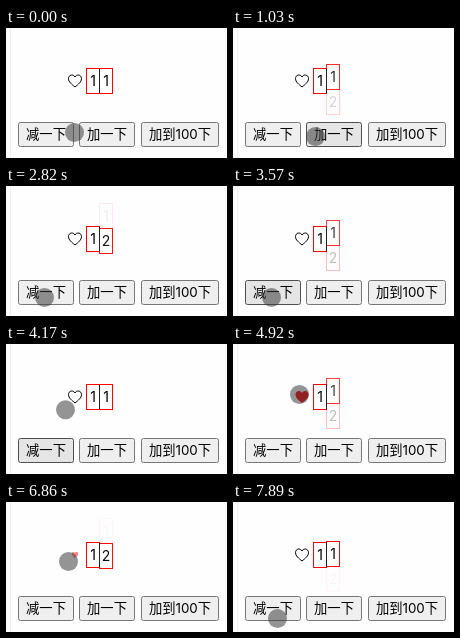
These frames come from a looping animation (221x130 px, 8000 ms). An HTML page with a canvas:

```html
<!DOCTYPE html>
<html lang="zh">
<meta charset="utf-8">
<style>
html, body { margin: 0; width: 100%; height: 100%; overflow: hidden; background: #fefefe }
canvas { display: block }
</style>
<canvas id="stage" width="221" height="130"></canvas>
<script>
const ctx = document.getElementById('stage').getContext('2d');
const LOOP = 8000, TICK = 148.4;
const SLIDE = 7.5, GLIDE = 4;      // lengths of a digit slide and a pointer move, in ticks
const TAPS = [5.75, 18.4, 31.1, 45.75];
const [PLUS, MINUS, LIKE, UNLIKE] = TAPS;
const FONT = 'Inter, "Noto Sans CJK SC", sans-serif';
const heart = new Path2D('M0 6C-3 3.5-6.5 1-6.5-2.3C-6.5-6.5-1.6-7.2 0-4C1.6-7.2 6.5-6.5 6.5-2.3C6.5 1 3 3.5 0 6Z');

// Pointer moves: start tick and destination
const moves = [
  [-3, 45, 110], [2, 82, 108], [13, 38, 111], [25, 66, 50],
  [34, 43, 101], [42, 62, 59], [48, 44, 116]
];

const clamp = u => Math.max(0, Math.min(1, u));

function pointerAt(k) {
  let x = 68, y = 104;
  for (const [start, toX, toY] of moves) {
    const u = start < 0 ? clamp(k) : clamp((k - start) / GLIDE);
    x += (toX - x) * u;
    y += (toY - y) * u;
  }
  return [x + .5, y + .5];
}

function label(text, x, y, size) {
  ctx.font = `${size}px ${FONT}`;
  ctx.textAlign = 'center';
  ctx.fillStyle = '#000';
  ctx.fillText(text, x, y);
}

function button(text, x, w, hover) {
  ctx.beginPath();
  ctx.roundRect(x + .5, 94.5, w - 1, 24, 2);
  ctx.fillStyle = hover ? '#e5e5e5' : '#efefef';
  ctx.fill();
  ctx.strokeStyle = hover ? '#4f4f4f' : '#767676';
  ctx.stroke();
  label(text, x + w / 2, 111, 13.33);
}

function digit(n, x, dy, alpha) {
  ctx.globalAlpha = alpha;
  ctx.strokeStyle = '#f00';
  ctx.strokeRect(x + .5, 40.5 + dy, 13, 25);
  label(n, x + 7, 58 + dy, 14);
  ctx.globalAlpha = 1;
}

function drawDigits(k) {
  digit(1, 80, 0, 1);
  const count = TAPS.filter(t => t <= k).length;
  const u = count ? clamp((k - TAPS[count - 1]) / SLIDE) : 1;
  const up = count % 2, dir = up ? -1 : 1;   // taps alternate between 1 to 2 and back
  if (u < 1) digit(2 - up, 93, Math.round(25 * u * dir), 1 - u);
  digit(1 + up, 93, Math.round(25 * (u - 1) * dir), u);
  ctx.fillStyle = '#222';
  ctx.fillRect(93, 41, 1, 24);
}

function drawHeart(k) {
  const liked = clamp(2 * (k - LIKE)) - clamp(2 * (k - UNLIKE));
  ctx.save();
  ctx.translate(69, 53);
  if (liked) {
    ctx.scale(liked, liked);
    ctx.globalAlpha = liked;
    ctx.fillStyle = '#f00';
    ctx.fill(heart);
  } else {
    ctx.strokeStyle = '#000';
    ctx.stroke(heart);
  }
  ctx.restore();
}

function draw(now) {
  const k = Math.floor((now % LOOP + 12) / TICK);
  ctx.fillStyle = '#fefefe';
  ctx.fillRect(0, 0, 221, 130);
  ctx.fillStyle = '#efefef';
  ctx.fillRect(4, 0, 1, 130);
  ctx.lineWidth = 1;
  button('减一下', 12, 56, k > MINUS + 1 && k < LIKE);
  button('加一下', 73, 56, k > PLUS && k < MINUS);
  button('加到100下', 135, 78, false);
  drawDigits(k);
  drawHeart(k);
  ctx.beginPath();
  ctx.arc(...pointerAt(k), 9.5, 0, 7);
  ctx.fillStyle = 'rgba(60,60,60,.55)';
  ctx.fill();
}

const origin = performance.now();
function frame() {
  draw(performance.now() - origin);
  requestAnimationFrame(frame);
}
frame();
</script>
</html>
```
